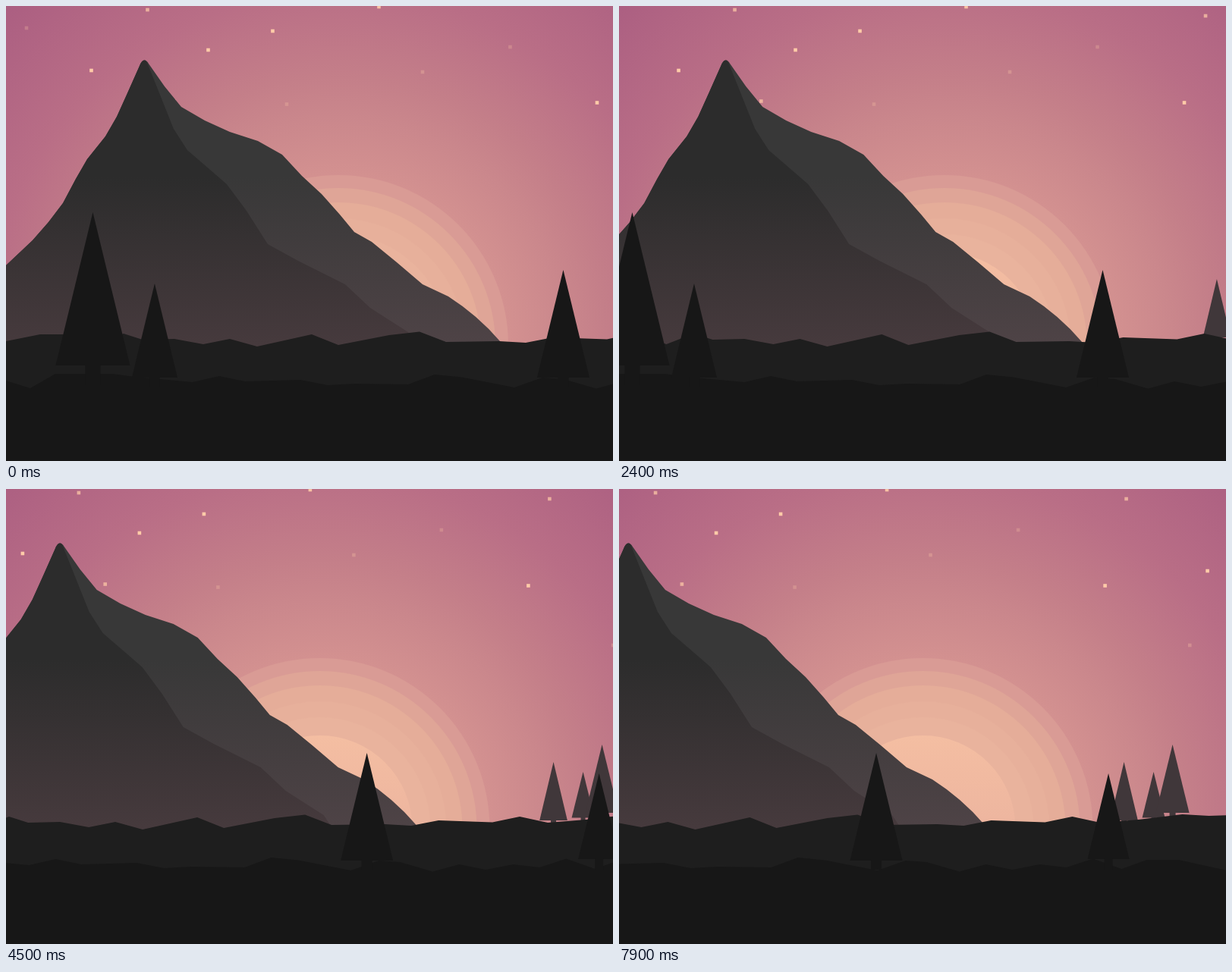
Recreate the animation shown at these times as an HTML page with a canvas. Size 800 by 600 pixels, loop 8 s.

```html
<!DOCTYPE html>
<html lang="en">
<head>
<meta charset="utf-8">
<title>Mountain sunset</title>
<style>
html, body { margin: 0; width: 100%; height: 100%; overflow: hidden; background: #171717; }
canvas { display: block; }
</style>
</head>
<body>
<canvas id="stage" width="800" height="600"></canvas>
<script>
const ctx = document.getElementById('stage').getContext('2d');
const LOOP = 8000, STEP = 100, START = 50, SWEEP = 7400, TRAVEL = 400;

// Share of the camera travel taken by each layer
const DEPTH = { sun: .095, stars: .35, mountain: .43, farTrees: .41, hills: .583, ground: .833, trees: 1 };

// x, y, opacity
const STARS = [
  [27, 29, .25], [186.5, 5, .72], [112.5, 85, 1], [266.5, 58, 1], [351.5, 33, 1],
  [491.5, 1, .9], [549, 87, .28], [370, 129.5, .25], [664.5, 54, .25], [779, 127.5, 1],
  [807, 13, .72], [221.3, 125.5, .72], [890.7, 206, .3], [914, 108, 1]
];

// apex x, apex y, half width, base y, trunk width, trunk end
const TREES = [
  [114.5, 272, 49, 474, 20, 500], [196, 366, 30, 490, 13, 502],
  [734.5, 348, 34.5, 490, 14, 502], [1040.5, 375, 27.5, 488, 11, 502]
];
const FAR_TREES = [
  [827.7, 360, 18.3, 437, 7, 445], [866.7, 373, 15, 433.5, 6, 445], [891.7, 337, 22, 427, 8, 445]
];

const ridge = new Path2D(
  'M-60 400 L0 342 L35 309 L56 285 L75 260 L92 228 L107 202 L131 172 L146 146 L160 115 L176 79 ' +
  'Q179 71 182.5 71.5 Q185.500 71.500 188 76 L209 106 L231 133 L262 151 L295 166 L332 178 L364 196 ' +
  'L390 224 L416 248 L440 275 L459 298 L482 311 L515 338 L549 367 L583 383 Q622 408 651 442 L665 460 H-60 Z');
const face = new Path2D(
  'M-60 400 L0 342 L35 309 L56 285 L75 260 L92 228 L107 202 L131 172 L146 146 L160 115 L176 79 ' +
  'Q179 71 182.5 71.5 Q185.500 71.500 187 77 L203 117 L221 162 L239 190 L268 215 L291 235 L317 270 ' +
  'L345 314 L385 336 L447 367 L480 398 L530 430 L550 460 H-60 Z');
const hills = new Path2D(
  'M-40 450 L0 442 L45 433 L82 433 L119 446 L155 432 L180 440 L222 439 L260 446 L295 439 L331 449 ' +
  'L403 433 L438 447 L505 434 L545 429.500 L580 443 L650 442 L685 444 L721 437 L792 439.500 L828 432 ' +
  'L865 440 L915 436 L973 429 L1008 431 L1060 429 V600 H-40 Z');
const ground = new Path2D(
  'M-40 484 L0 494 L32 504 L65 485 L140 485 L170 489 L246 496 L281 488 L315 495 L388 493 L424 500 ' +
  'L460 498 L530 499 L565 486 L601 489.500 L670 503 L707 490 L735 492 L778 504.500 L813 495 L848 502 ' +
  'L884 495 L919 499 L954 487.500 L992 501 L1025 489 L1067 489 L1140 505 V600 H-40 Z');

function gradient(g, stops) {
  for (const [at, color] of stops) g.addColorStop(at, color);
  return g;
}
const rockShade = (top, bottom) => gradient(ctx.createLinearGradient(0, 225, 0, 445), [[0, top], [1, bottom]]);
const ridgeFill = rockShade('#383838', '#4e4346');
const faceFill = rockShade('#2c2c2c', '#463a3d');
const skyFill = gradient(ctx.createRadialGradient(0, 0, 0, 0, 0, 640), [
  [0, '#d99b93'], [.35, '#d39190'], [.47, '#ca878c'], [.55, '#c47f89'], [.73, '#b96e86'], [1, '#aa5d81']
]);
const coreFill = gradient(ctx.createLinearGradient(0, -122, 0, 0), [[0, '#f4bea2'], [1, '#edb59f']]);
const RINGS = [[224, '#d99b95'], [207, '#dfa597'], [188, '#e5ad99'], [167, '#e7b09b'], [146, '#e9b39d'], [122, coreFill]];

// Symmetric cubic ease with handles at .32 and .68
function ease(x) {
  let lo = 0, hi = 1;
  for (let i = 0; i < 24; i++) {
    const s = (lo + hi) / 2;
    if (.96 * s + .12 * s * s - .08 * s * s * s < x) lo = s; else hi = s;
  }
  return lo * lo * (3 - 2 * lo);
}

function camera(time) {
  const u = Math.abs(time - START) / SWEEP;
  return TRAVEL * ease(u > 1 ? 2 - u : u);
}

function layer(shift, draw) {
  ctx.save();
  ctx.translate(-shift, 0);
  draw();
  ctx.restore();
}

function fill(path, color) {
  ctx.fillStyle = color;
  ctx.fill(path);
}

function drawTrees(list, color) {
  ctx.fillStyle = color;
  for (const [x, top, half, base, trunk, end] of list) {
    ctx.beginPath();
    ctx.moveTo(x, top);
    ctx.lineTo(x + half, base);
    ctx.lineTo(x - half, base);
    ctx.fill();
    ctx.fillRect(x - trunk / 2, base - 1, trunk, end - base + 1);
  }
}

function drawSky() {
  ctx.translate(438, 447);
  ctx.fillStyle = skyFill;
  ctx.fillRect(-500, -450, 1000, 620);
  for (const [radius, color] of RINGS) {
    ctx.fillStyle = color;
    ctx.beginPath();
    ctx.arc(0, 0, radius, 0, Math.PI * 2);
    ctx.fill();
  }
}

function drawStars() {
  ctx.fillStyle = '#ffcba8';
  for (const [x, y, alpha] of STARS) {
    ctx.globalAlpha = alpha;
    ctx.fillRect(x - 2.3, y - 2.3, 4.6, 4.6);
  }
}

function render(time) {
  const pan = camera(time);
  layer(pan * DEPTH.sun, drawSky);
  layer(pan * DEPTH.stars, drawStars);
  layer(pan * DEPTH.mountain, () => {
    fill(ridge, ridgeFill);
    fill(face, faceFill);
  });
  layer(pan * DEPTH.farTrees, () => drawTrees(FAR_TREES, '#40373a'));
  layer(pan * DEPTH.hills, () => fill(hills, '#1e1e1e'));
  layer(pan * DEPTH.ground, () => fill(ground, '#171717'));
  layer(pan * DEPTH.trees, () => drawTrees(TREES, '#171717'));
}

const origin = performance.now();
function tick() {
  const time = (performance.now() - origin) % LOOP;
  render(Math.floor(time / STEP) * STEP);
  requestAnimationFrame(tick);
}
tick();
</script>
</body>
</html>
```
